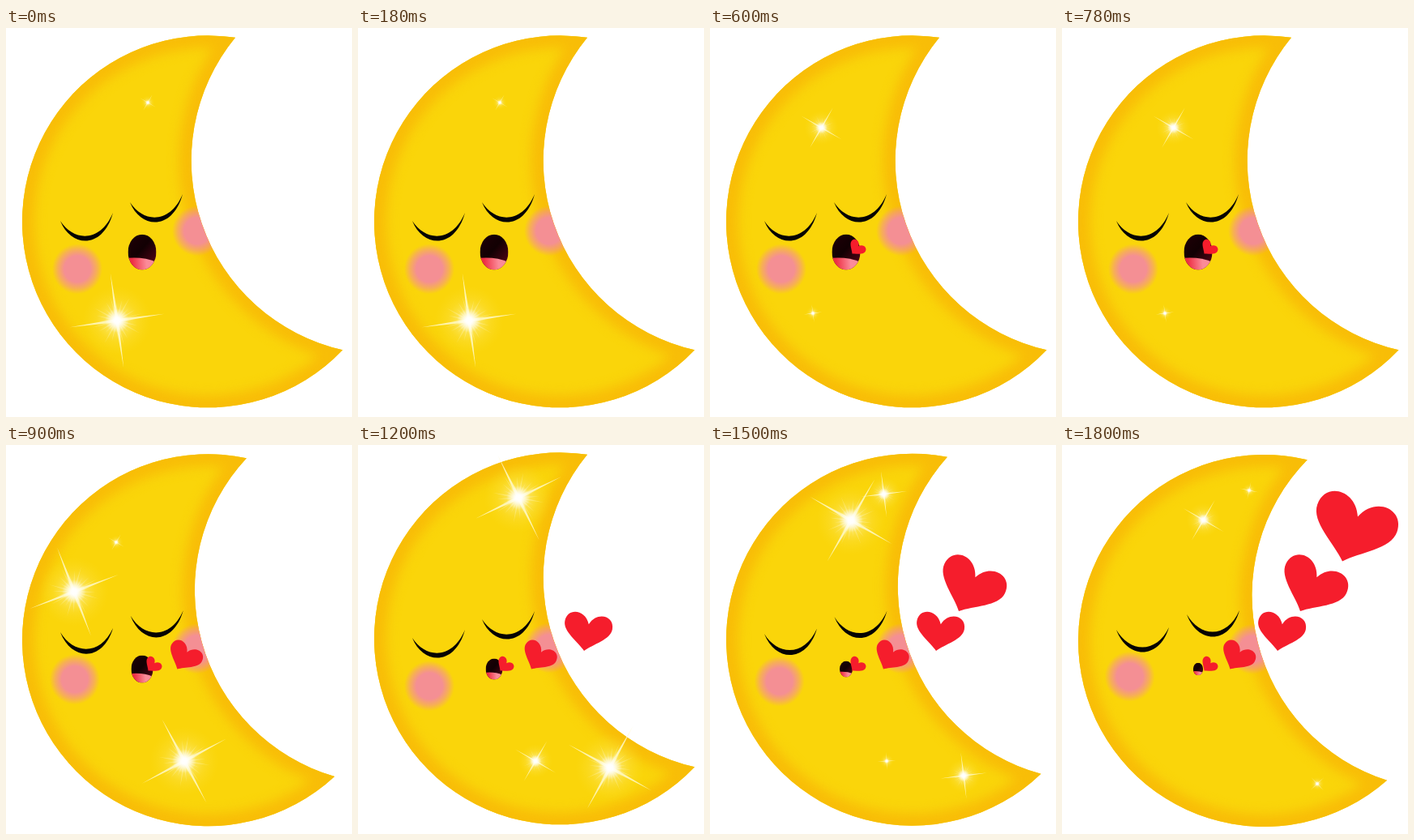
Write an HTML page with a canvas that moves like this. It is 427 px wide and 480 px high and loops after 2.1 s.

```html
<!DOCTYPE html>
<html lang="en">
<head>
<meta charset="utf-8">
<title>Moon blowing kisses</title>
<style>
html, body { margin: 0; width: 100%; height: 100%; overflow: hidden; background: #fff; }
canvas { display: block; width: 427px; height: 480px; }
</style>
</head>
<body>
<canvas id="stage" width="427" height="480"></canvas>
<script>
const ctx = document.getElementById('stage').getContext('2d');
const STEP = 300;
const RAD = Math.PI / 180;

// How far the moon leans in each pose; everything on its face follows
const SWAY = [0, 0.5, 0, 0.7, 0, 0.5, 1];
const POSES = SWAY.length;

// Each sparkle bursts, then shrinks over the next poses while it drifts
const BURST = [57, 28, 11];
const SPARKLES = [
  { born: 0, from: [137, 361], to: [127, 352], angle: -8 },
  { born: 1, from: [139, 126], to: [136, 120], angle: 30 },
  { born: 1, from: [85, 189], to: [84, 181], angle: 0, turn: -10.5, arms: [28, 0, 57] },
  { born: 3, from: [220, 390], to: [218, 390], angle: -28, turn: 58 },
  { born: 4, from: [311, 398], to: [315, 418], angle: 29, turn: -36 },
  { born: 4, from: [198, 65], to: [231, 56], angle: -26, turn: 19 },
  { born: 5, from: [174, 93], to: [175, 92], angle: 30 }
];

// Hearts from the lips outward, one more per pose
const HEARTS = [
  { tip: [175.5, 278.5], width: 21.5, angle: 40 },
  { tip: [214, 276.5], width: 43, angle: 30 },
  { tip: [279, 254], width: 59.5, angle: 10 },
  { tip: [307, 205], width: 83, angle: 26 },
  { tip: [359, 143.5], width: 104, angle: 19 }
];
const HEART = new Path2D('M0 0C-.16-.17-.5-.32-.5-.54C-.5-.83-.12-.86 0-.56C.12-.86.5-.83.5-.54C.5-.32.16-.17 0 0Z');

// Crescent and cheeks are relative to the moon's centre
const CRESCENT = new Path2D('M33-227.5A229.5 229.5 0 1 0 165.5 158A239.5 239.5 0 0 1 33-227.5Z');
const CHEEKS = [[-162, 58], [-14, 11]];

const mix = (a, b, t) => a + (b - a) * t;

function at(x, y, angle, size, draw) {
  ctx.save();
  ctx.translate(x, y);
  ctx.rotate(angle * RAD);
  ctx.scale(size, size);
  draw();
  ctx.restore();
}

function glow(x, y, r, stops) {
  const g = ctx.createRadialGradient(x, y, 0, x, y, r);
  stops.forEach(([p, c]) => g.addColorStop(p, c));
  ctx.fillStyle = g;
  ctx.fillRect(x - r, y - r, 2 * r, 2 * r);
}

function moon(sway) {
  at(250, 239.3 + 2.7 * sway, 5 * sway, 1, () => {
    ctx.clip(CRESCENT);
    ctx.fillStyle = '#fad50a';
    ctx.fillRect(-240, -240, 480, 480);
    ctx.filter = 'blur(7px)';
    ctx.strokeStyle = '#f8bd07';
    ctx.lineWidth = 30;
    ctx.stroke(CRESCENT);
    ctx.filter = 'none';
    CHEEKS.forEach(([x, y]) => glow(x, y, 31,
      [[0, '#f48f94'], [0.52, '#f48f94'], [0.78, '#f48f9488'], [1, '#f48f9400']]));
  });
}

function eye(x, left, right, low) {
  const mid = (left + right) / 2;
  const pull = bottom => (bottom - mid / 4) / 0.75;
  const outer = pull(low), inner = pull(low - 6);
  ctx.fillStyle = '#050303';
  ctx.beginPath();
  ctx.moveTo(x, left);
  ctx.bezierCurveTo(x + 14, outer, x + 53, outer, x + 65, right);
  ctx.bezierCurveTo(x + 50, inner, x + 17, inner, x, left);
  ctx.fill();
}

function eyes(sway) {
  eye(67, 238 - 10 * sway, 228 - 3 * sway, 262.5 - 7 * sway);
  eye(153 + sway, 215 - 6 * sway, 205 - sway, 239.5 - 3 * sway);
}

// Opens wide, then closes by the same ratio at every pose
function mouth(pose) {
  const w = pose ? 22.8 * 0.77 ** (pose - 1) : 17.5;
  ctx.save();
  ctx.translate(168, 276.5);
  ctx.scale(w, 1.25 * w);
  ctx.beginPath();
  ctx.arc(0, 0, 1, 0, 2 * Math.PI);
  ctx.clip();
  const dark = ctx.createLinearGradient(-0.7, -0.8, 0.7, 0.7);
  dark.addColorStop(0, '#1c0006');
  dark.addColorStop(0.45, '#120003');
  dark.addColorStop(1, '#4c0314');
  ctx.fillStyle = dark;
  ctx.fillRect(-1, -1, 2, 2);
  const tongue = ctx.createLinearGradient(-0.7, 0.6, 0.3, 0.5);
  tongue.addColorStop(0, '#ee2f44');
  tongue.addColorStop(1, '#fb8b98');
  ctx.fillStyle = tongue;
  ctx.beginPath();
  ctx.moveTo(-1, 0.33);
  ctx.quadraticCurveTo(0.15, 0.26, 1, 0.56);
  ctx.lineTo(1, 1);
  ctx.lineTo(-1, 1);
  ctx.fill();
  ctx.restore();
}

function ray(angle, length, width) {
  at(0, 0, angle, 1, () => {
    ctx.beginPath();
    ctx.moveTo(0, -width);
    ctx.lineTo(length, 0);
    ctx.lineTo(0, width);
    ctx.fill();
  });
}

function sparkle({ born, from, to, angle, turn = 0, arms = BURST }, pose) {
  const age = (pose - born + POSES) % POSES;
  if (!arms[age]) return;
  const [x, y] = from.map((v, k) => mix(v, to[k], age / 2));
  at(x, y, angle + turn * age, arms[age], () => {
    glow(0, 0, 0.75, [[0, '#fffbd8c0'], [0.25, '#fff6b080'], [0.6, '#ffee8030'], [1, '#ffe84000']]);
    ctx.fillStyle = '#fffce048';
    for (let i = 0; i < 24; i++) ray(i * 15 + 7, 0.36 + 0.1 * (i % 3), 0.025);
    ctx.fillStyle = '#fffbd0d0';
    for (let i = 0; i < 4; i++) ray(i * 90, 1.03, 0.035);
    glow(0, 0, 0.26, [[0, '#fff'], [0.25, '#fffffff0'], [1, '#ffffff00']]);
  });
}

// A strong lean pulls the outer hearts back with the moon
function hearts(pose) {
  const pull = 26 * Math.max(0, SWAY[pose] - 0.5);
  HEARTS.slice(0, Math.max(0, pose - 1)).forEach(({ tip: [x, y], width, angle }, k) =>
    at(x - pull * Math.min(1, k / 2), y, angle, width, () => {
      ctx.fillStyle = '#f51d2c';
      ctx.fill(HEART);
    }));
}

function draw(pose) {
  ctx.clearRect(0, 0, 427, 480);
  moon(SWAY[pose]);
  eyes(SWAY[pose]);
  mouth(pose);
  SPARKLES.forEach(s => sparkle(s, pose));
  hearts(pose);
}

const start = performance.now();
let shown = -1;
function tick() {
  const pose = Math.floor((performance.now() - start) / STEP) % POSES;
  if (pose !== shown) draw(shown = pose);
  requestAnimationFrame(tick);
}
tick();
</script>
</body>
</html>
```
